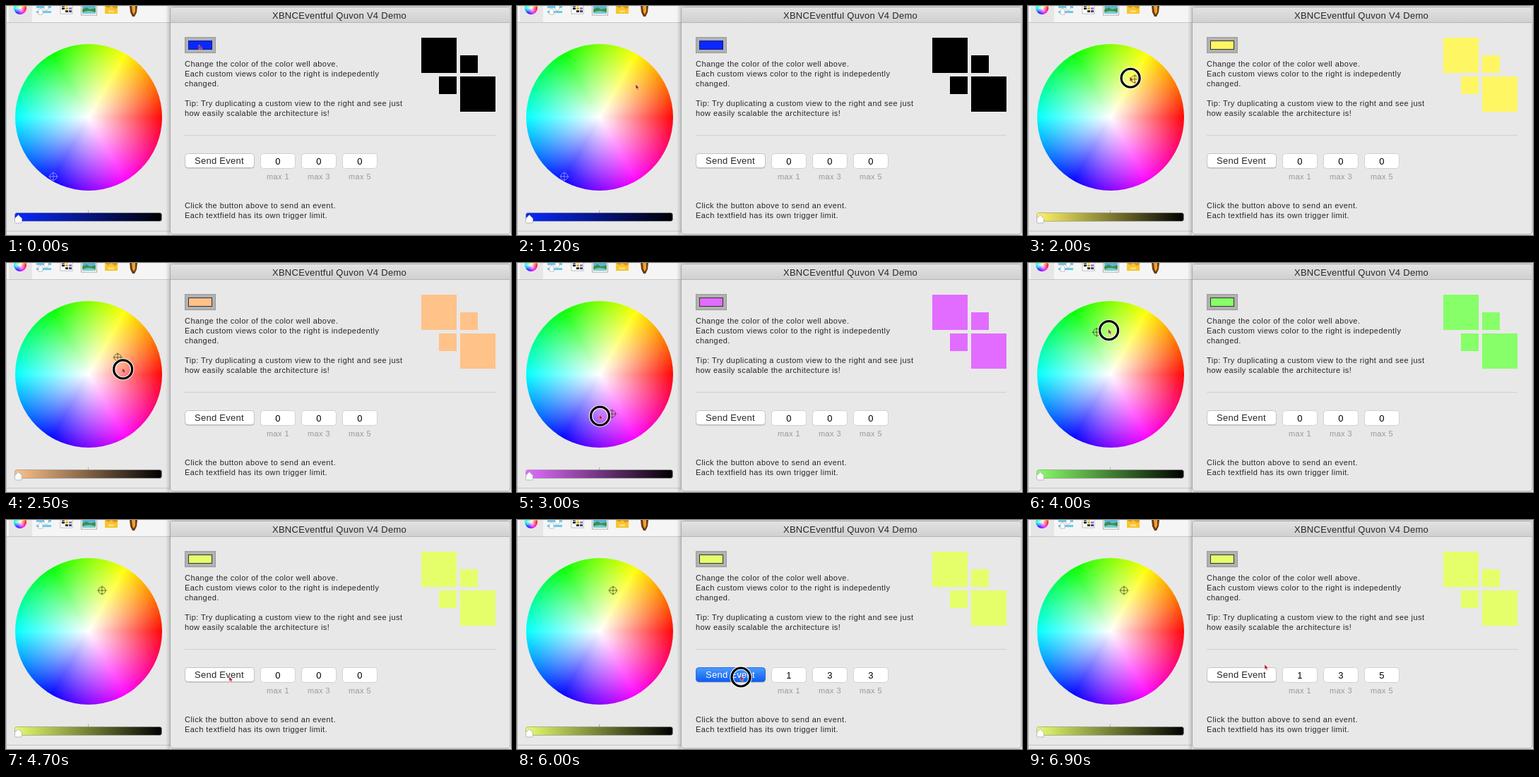
Recreate the animation shown at these times as an HTML page. Size 715 px wide and 325 px high, loop 7900 ms.

```html
<!DOCTYPE html>
<html lang="en">
<head>
<meta charset="utf-8">
<title>XBNCEventful Demo</title>
<style>
html, body { margin: 0; width: 100%; height: 100%; overflow: hidden; background: #e8e8e8; }
svg { position: absolute; left: 0; top: 0; display: block; }
.wheel {
  position: absolute; border-radius: 50%;
  background: radial-gradient(closest-side, #fff, rgba(255,255,255,.02)),
    conic-gradient(from 90deg, #f00, #f0f, #00f, #0ff, #0f0, #ff0, #f00);
}
#big { left: 12.5px; top: 53.5px; width: 208px; height: 208px; }
#small { left: 11px; top: -6px; width: 18px; height: 18px; }
#bar { position: absolute; left: 0; top: 0; width: 232px; height: 23px; background: #f5f5f5; }
#tab { position: absolute; left: 4px; top: 0; width: 33px; height: 23px; background: #e6e6e6; }
text { font-family: "Liberation Sans", Arial, sans-serif; font-size: 11px; letter-spacing: .44px; fill: #262626; }
.big { font-size: 13px; letter-spacing: .28px; }
.mid { text-anchor: middle; }
.num { fill: #000; }
.dim { fill: #999; }
</style>
</head>
<body>
<div id="bar"></div>
<div id="tab"></div>
<div id="small" class="wheel"></div>
<div id="big" class="wheel"></div>
<svg id="stage" width="715" height="325" viewBox="0 0 715 325">
  <defs>
    <linearGradient id="title" x2="0" y2="1"><stop stop-color="#e2e2e2"/><stop offset="1" stop-color="#d0d0d0"/></linearGradient>
    <linearGradient id="press" x2="0" y2="1"><stop stop-color="#4b9cfc"/><stop offset="1" stop-color="#0f5cf2"/></linearGradient>
    <linearGradient id="edge"><stop stop-color="#000" stop-opacity="0"/><stop offset="1" stop-color="#000" stop-opacity=".16"/></linearGradient>
    <linearGradient id="shade"><stop id="tint"/><stop offset="1" stop-color="#000"/></linearGradient>
  </defs>

  <!-- colour panel -->
  <path d="M0 23.5H232M0 319.5H232" stroke="#c6c6c6"/>
  <path d="M.5 0V325" stroke="#b4b4b4"/>
  <g id="icons">
    <path d="M43 1.500H64M43 8.500H64" stroke="#6cc8ec" stroke-width="3"/>
    <path d="M54 -1h6v5l-3 3l-3 -3zM46 6l3 -3l3 3v6h-6z" fill="#fff" stroke="#aaa" stroke-width=".7"/>
    <rect x="77" y="-3" width="17" height="14" fill="#fff" stroke="#bbb"/>
    <rect x="106.5" y="-3" width="22" height="16" fill="#fff" stroke="#aaa"/>
    <path d="M108 0H127V6H108z" fill="#5cb4e4"/>
    <path d="M108 5l6 -3l5 3l8 -2v8H108z" fill="#3f9038"/>
    <path d="M108 9q9 -4 19 0v2H108z" fill="#78c8d8"/>
    <path d="M140 -1H158V11H140z" fill="#f7c52e"/>
    <path d="M140 0l5 3l4 -3l5 4l4 -2v-3H140z" fill="#e2961e"/>
    <path d="M145 6h8v3h-8z" fill="#fbdf7a"/>
    <path d="M175 0h11l-1 9l-3 6h-3l-3 -6z" fill="#6a3d14"/>
    <path d="M178 0h5v8l-2 4l-2 -3z" fill="#f0a02c"/>
  </g>
  <path d="M116.5 290V294" stroke="#aaa"/>
  <rect x="12.5" y="293.5" width="208" height="12" rx="3" fill="url(#shade)" stroke="#999" stroke-opacity=".7"/>
  <path d="M17.5 296.5l5 5v5q0 1.5 -1.5 1.5h-7q-1.5 0 -1.5 -1.5v-5z" fill="#fff" stroke="#a8a8a8" stroke-width=".8"/>
  <g id="cross" fill="none"><circle r="5"/><path d="M-6.5 0H6.5M0 -6.5V6.5"/></g>

  <!-- demo window -->
  <rect x="226" width="6" height="325" fill="url(#edge)"/>
  <path d="M232 0H715V4H232z" fill="#d6d6d6"/>
  <path d="M232.5 319V6q0 -4.5 5 -4.5H709q5 0 5 4.500V319q0 5 -5 5H237q-4.5 0 -4.5 -5z" fill="#e8e8e8" stroke="#a9a9a9"/>
  <path d="M233 23V6q0 -4 4.500 -4H709q4.500 0 4.500 4V23z" fill="url(#title)"/>
  <path d="M233 23.5H713.5" stroke="#b5b5b5"/>
  <text class="big mid" x="472" y="18">XBNCEventful Quvon V4 Demo</text>
  <rect x="253.5" y="44.5" width="43" height="22" fill="#b1b1b1" stroke="#9a9a9a"/>
  <rect id="well" x="258.5" y="49.5" width="33" height="12" stroke="#333"/>
  <g id="views">
    <rect x="588" y="45" width="50" height="50"/>
    <rect x="643" y="70" width="25" height="25"/>
    <rect x="613" y="100" width="25" height="25"/>
    <rect x="643" y="100" width="50" height="50"/>
  </g>
  <g id="copy"></g>
  <path d="M253 183.5H693" stroke="#d0d0d0"/>
  <rect x="253.5" y="210.5" width="98" height="20" rx="4" fill="#aaa"/>
  <rect id="button" x="253.5" y="209.5" width="98" height="20" rx="4" stroke="#c3c3c3"/>
  <text id="send" class="big mid" x="302" y="224">Send Event</text>
  <g id="fields"></g>

  <g id="ring" fill="none">
    <circle r="13" stroke="#fff" stroke-width="5.5" stroke-opacity=".8"/>
    <circle r="13" stroke="#000" stroke-width="3.2"/>
  </g>
  <path id="cursor" d="M-1 -2V5L.8 3.6L2 6.2L3.2 5.6L2.2 3.2H4.2z" fill="#b5202c" stroke="#fff" stroke-opacity=".55" stroke-width=".7"/>
</svg>
<script>
const LOOP = 7900, STEP = 100, CX = 116, CY = 157, R = 104;
const GRAB = 1600, DROP = 4200;
const $ = id => document.getElementById(id);

function add(parent, tag, attrs, content = '') {
  const el = document.createElementNS('http://www.w3.org/2000/svg', tag);
  for (const k in attrs) el.setAttribute(k, attrs[k]);
  el.textContent = content;
  return parent.appendChild(el);
}

[[86, 'Change the color of the color well above.'],
 [100, 'Each custom views color to the right is indepedently'],
 [114, 'changed.'],
 [142, 'Tip: Try duplicating a custom view to the right and see just'],
 [156, 'how easily scalable the architecture is!'],
 [287, 'Click the button above to send an event.'],
 [301, 'Each textfield has its own trigger limit.']
].forEach(([y, line]) => add($('copy'), 'text', { x: 253, y }, line));

const limits = [1, 3, 5];
const counters = limits.map((max, i) => {
  const x = 360.5 + 58 * i, g = $('fields');
  add(g, 'rect', { x, y: 209.5, width: 49, height: 21, rx: 4, fill: '#fff', stroke: '#d2d2d2' });
  add(g, 'text', { x: x + 24.5, y: 246, class: 'mid dim' }, 'max ' + max);
  return add(g, 'text', { x: x + 24.5, y: 225, class: 'big mid num' }, '0');
});

const swatches = ['#222', '#f0c820', '#fff', '#224', '#e0b020', '#88c', '#fff', '#333', '#448'];
swatches.forEach((fill, i) => add($('icons'), 'rect',
  { x: 79 + i % 3 * 5, y: -2 + Math.floor(i / 3) * 4, width: 4, height: 3, fill }));

// Keys are [time, a, b]; values between keys are linear.
function track(keys, t) {
  let i = 0;
  while (i < keys.length - 2 && t > keys[i + 1][0]) i++;
  const [p, q] = [keys[i], keys[i + 1]];
  const k = Math.min(1, Math.max(0, (t - p[0]) / (q[0] - p[0])));
  return [p[1] + (q[1] - p[1]) * k, p[2] + (q[2] - p[2]) * k];
}

// Drag inside the wheel: angle in degrees, radius
const drag = [[GRAB, 40, 69], [2000, 62, 62], [2400, 28.7, 48], [2500, 7, 50],
  [2900, -72, 60], [3400, -154.7, 61], [3500, -172, 57.6],
  [3800, -236, 62], [4100, -285, 61], [DROP, -289.3, 60.4]];
const approach = [[0, 274, 57], [300, 216, 82], [500, 138, 142], [700, 66, 180],
  [900, 92, 153], [1200, 169, 113], [GRAB, 169, 113]];
const leave = [[DROP, 136, 100], [4400, 205, 155], [4600, 300, 215], [4700, 317, 224], [4900, 317, 223]];
const clicks = [[4900, 5100], [5300, 5500], [5600, 5800], [5900, 6100], [6300, 6500], [6600, 6700]];

function onWheel([deg, r]) {
  const a = deg * Math.PI / 180;
  return [CX + r * Math.cos(a), CY - r * Math.sin(a)];
}

function colorOf([deg, r]) {
  const hue = (deg + 720) % 360 / 60, s = r / R;
  const part = n => {
    const k = (n + hue) % 6;
    return Math.round(255 * (1 - s * Math.max(0, Math.min(k, 4 - k, 1))));
  };
  return `rgb(${part(5)},${part(3)},${part(1)})`;
}

function pointer(t) {
  if (t < GRAB) return track(approach, t);
  if (t <= DROP) return onWheel(track(drag, t));
  return t < 6900 ? track(leave, t) : [336, 207];
}

const place = (id, [x, y]) => $(id).setAttribute('transform', `translate(${x.toFixed(2)} ${y.toFixed(2)})`);
const paint = (id, color) => $(id).setAttribute('fill', color);

function draw(t) {
  const picked = t >= GRAB;
  const pick = track(drag, t - STEP); // the panel trails the pointer by one step
  const color = picked ? colorOf(pick) : 'rgb(10,40,255)';
  const pressed = clicks.some(([a, b]) => t >= a && t < b);
  const sent = clicks.filter(c => t >= c[1]).length;
  const at = pointer(t);

  place('cursor', at);
  place('ring', at);
  $('ring').style.display = pressed || picked && t <= DROP ? '' : 'none';

  place('cross', picked ? onWheel(pick) : [67, 242]);
  $('cross').setAttribute('stroke', picked ? 'rgba(50,45,0,.65)' : 'rgba(150,150,255,.9)');
  paint('well', color);
  $('well').setAttribute('stroke', picked ? '#333' : '#0a1a90');
  paint('views', t > GRAB ? color : '#000');
  $('tint').setAttribute('stop-color', color);

  paint('button', pressed ? 'url(#press)' : '#fff');
  $('button').setAttribute('stroke', pressed ? '#2a6ee0' : '#c3c3c3');
  $('send').style.fill = pressed ? '#fff' : '';
  counters.forEach((el, i) => { el.textContent = Math.min(sent, limits[i]); });
}

const start = performance.now();
function tick(now) {
  const t = Math.max(0, now - start) % LOOP;
  draw(Math.floor(t / STEP) * STEP);
  requestAnimationFrame(tick);
}
draw(0);
requestAnimationFrame(tick);
</script>
</body>
</html>
```
